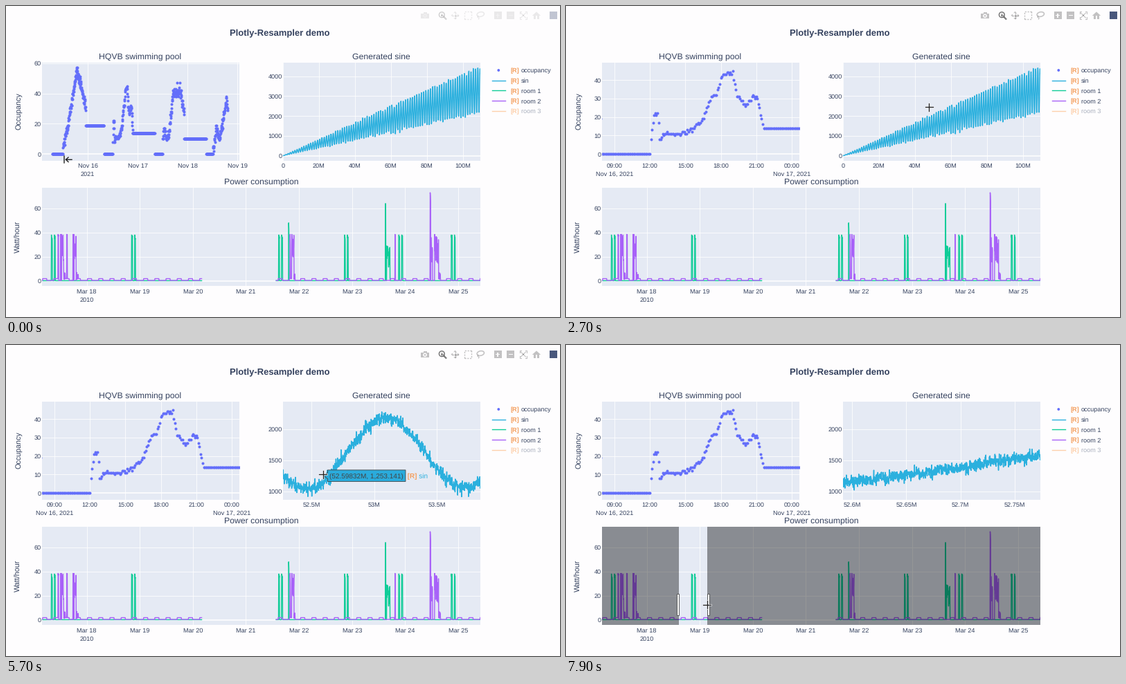
A matplotlib script for the animation above (8 s loop, 800x450 px).

```python
import matplotlib.pyplot as plt
import numpy as np
from matplotlib.animation import FuncAnimation
from matplotlib.lines import Line2D
from matplotlib.patches import Circle, Ellipse, Polygon, Rectangle
from matplotlib.patheffects import withStroke

W, H, STEP, LOOP = 800, 450, 100, 8000
PT = 0.72  # points per pixel at 100 dpi
PAPER, PLOT, INK, GREY = "#fefdfe", "#e5eaf4", "#35425f", "#444444"
DOT, SINE, GREEN, PURPLE = "#636efa", "#2bb0de", "#10cc98", "#a862f8"
TAG, SAND = "#f4a060", "#fdd0ac"

plt.rcParams.update({"font.family": "Liberation Sans", "path.simplify": False,
                     "text.hinting": "none"})
fig = plt.figure(figsize=(W / 100, H / 100), dpi=100, facecolor=PAPER)
ax = fig.add_axes([0, 0, 1, 1])
ax.set_xlim(0, W)
ax.set_ylim(H, 0)
ax.axis("off")
rng = np.random.default_rng(11)


def line(xs, ys, px=1.0, color="white", z=2, **kw):
    return ax.add_line(Line2D(xs, ys, lw=px * PT, color=color, zorder=z, **kw))


def rect(x0, y0, x1, y1, color, z=1, **kw):
    return ax.add_patch(Rectangle((x0, y0), x1 - x0, y1 - y0, fc=color, zorder=z, **kw))


def poly(points, color=GREY, z=7, **kw):
    return ax.add_patch(Polygon(points, **{"fc": color, "ec": "none", "zorder": z, **kw}))


def text(x, y, s, px=9.2, color=INK, ha="center", z=6, **kw):
    """Text whose capitals are centred on y."""
    return ax.text(x, y + 0.36 * px, s, size=px * PT, color=color, ha=ha,
                   va="baseline", zorder=z, **kw)


class View:
    """One state of a subplot: its ranges, ticks, grid and traces."""

    def __init__(self, box, xr, yr, xticks, yticks):
        self.box, self.xr, self.yr, self.parts = box, xr, yr, []
        x0, y0, x1, y1 = box
        self.clip = Rectangle((x0, y0), x1 - x0, y1 - y0, transform=ax.transData)
        for v, label in xticks:
            x = self.px(v)
            label, *below = label.split("\n")
            self.parts += [line([x, x], [y0, y1], 0.8), text(x, y1 + 7.3, label)]
            self.parts += [text(x, y1 + 19.5, s) for s in below]
        for v in yticks:
            y = self.py(v)
            self.parts += [line([x0, x1], [y, y], 0.8 if v else 1.6),
                           text(x0 - 1, y, str(v), ha="right")]

    def px(self, v):
        x0, _, x1, _ = self.box
        return x0 + (np.asarray(v) - self.xr[0]) / (self.xr[1] - self.xr[0]) * (x1 - x0)

    def py(self, v):
        _, y0, _, y1 = self.box
        return y1 - (np.asarray(v) - self.yr[0]) / (self.yr[1] - self.yr[0]) * (y1 - y0)

    def trace(self, x, y, color, px=1.5, z=3, **kw):
        art = line(self.px(x), self.py(y), px, color, z, solid_joinstyle="round", **kw)
        art.set_clip_path(self.clip)
        self.parts.append(art)

    def show(self, on):
        for p in self.parts:
            p.set_visible(on)


POOL = (51.5, 82, 337, 223.5)
SIN = (400, 82, 685, 223.5)
POWER = (51.5, 263.2, 685, 405)
for b in (POOL, SIN, POWER):
    rect(*b, PLOT)

# --- swimming pool, in hours: zeros, a busy stretch, then a stuck level ---
DAYS = [
    (-17, 19, [(-12, 3), (-9, 24), (-5.3, 55), (-3.3, 45), (-1, 30)]),
    (7.9, 14, [(12.05, 7), (12.35, 21), (12.7, 21), (12.8, 8), (13.1, 10.5), (15.4, 12),
               (16.5, 19), (17.2, 31), (17.6, 32), (18.1, 43), (19, 44), (19.4, 31),
               (20.1, 26), (20.7, 31), (21.1, 30), (21.6, 15)]),
    (32.2, 10, [(36, 11), (37, 17), (38, 9), (39, 12), (41, 40), (44.4, 42), (46.4, 26)]),
    (57, 0, [(60.2, 2), (62, 17), (63.3, 9), (66.8, 36), (67.3, 28)]),
]
hours = np.arange(-17, 67.3, 1 / 11)
people = np.zeros(hours.size)
for start, rest, keys in DAYS:
    h, v = np.array(keys).T
    busy = (hours >= h[0]) & (hours <= h[-1])
    people[hours >= start] = 0
    people[busy] = np.interp(hours[busy], h, v)
    people[busy] += rng.normal(0, 0.6 if start == 7.9 else 1.7, busy.sum())
    people[hours > h[-1]] = rest
people = people.round().clip(0)

pool_views = [
    View(POOL, (-22.17, 73), (-4.24, 60.3),
         [(24 * d, f"Nov {16 + d}" + ("" if d else "\n2021")) for d in range(4)],
         range(0, 61, 20)),
    View(POOL, (7.92, 24.65), (-3.48, 49.4),
         [(h, f"{h % 24:02}:00" + (f"\nNov {16 + h // 24}, 2021" if h in (9, 24) else ""))
          for h in range(9, 25, 3)], range(0, 41, 10)),
]
for v in pool_views:
    v.trace(hours, people, DOT, ls="none", marker="o", ms=4 * PT, mew=0)

# --- growing noisy sine, x in millions ---
ZOOM_Y = (872, 2444)


def millions(start, stop, step):
    return [(m, f"{m:g}M" if m else "0") for m in np.arange(start, stop, step)]


sine_views = [View(SIN, (0, 109.8), (-236, 4685), millions(0, 101, 20),
                   range(0, 4001, 1000))]
sine_views += [View(SIN, xr, ZOOM_Y, millions(*ticks), range(1000, 2001, 500))
               for xr, ticks in (((47.82, 58.2), (48, 59, 2)),
                                 ((52.273, 53.845), (52.5, 53.6, 0.5)),
                                 ((52.5914, 52.774), (52.6, 52.76, 0.05)))]
for v in sine_views:
    m = np.linspace(*v.xr, 1000)
    noise = rng.normal(0, 0.95, m.size) * np.minimum(m, 55)
    v.trace(m, m * (30.4 + 10.6 * np.sin(m / 0.2)) + noise, SINE, 1.5)

# --- power consumption, x in pixels ---
power = View(POWER, (51.5, 685), (-4.1, 76.9),
             [(116.5 + 76.65 * d, f"Mar {18 + d}" + ("" if d else "\n2010"))
              for d in range(8)], range(0, 61, 20))
px = np.arange(51.5, 685, 0.3)
outage = (px > 282.5) & (px < 390)


def burst(y, starts, width, low, high):
    for x in starts:
        k = (px >= x) & (px < x + width)
        y[k] = rng.uniform(low, high, k.sum())
        y[np.argmax(k)] = high


green = np.full(px.size, 0.2)
for x in (65.5, 181.3, 393.6, 488.6, 567, 643):
    burst(green, (x, x + 4.3), 1.3, 34, 38)
burst(green, [408], 0.7, 40, 48)
burst(green, [547.7], 0.7, 55, 64)
burst(green, [549.5], 5, 9, 29)

purple = np.where((px - 117.5) % 16.2 < 6, 1.9, 0.4)
burst(purple, (83, 102, 415, 625), 2.4, 1, 7)
burst(purple, (75, 78.7, 87.6, 96.7, 410, 561.5), 0.8, 28, 38.5)
burst(purple, (80, 98, 412.5, 619), 3.2, 17, 38.5)
burst(purple, [613.4, 622], 2.6, 13, 36)
burst(purple, [612.4], 0.7, 60, 73)
for y, color, z in ((green, GREEN, 3), (purple, PURPLE, 4)):
    y[outage] = np.nan
    power.trace(px, y, color, 1.4, z)

# --- titles and legend ---
text(395.2, 38.8, "Plotly-Resampler demo", 13.05, weight="bold")
for x, y, s in ((194, 72.7, "HQVB swimming pool"), (542.3, 72.7, "Generated sine"),
                (368.3, 254.3, "Power consumption")):
    text(x, y, s, 12.24)
for y, s in ((152.5, "Occupancy"), (334, "Watt/hour")):
    ax.text(18, y, s, size=10.75 * PT, color=INK, rotation=90, ha="center", va="center")

LEGEND = [("occupancy", DOT), ("sin", SINE), ("room 1", GREEN), ("room 2", PURPLE),
          ("room 3", SAND)]
for i, (name, color) in enumerate(LEGEND):
    y, off = 93 + 14.65 * i, name == "room 3"
    if i:
        line([702, 720.5], [y, y], 1.4, color)
    else:
        ax.add_patch(Circle((711.3, y), 1.9, fc=color))
    text(728.3, y + 0.3, "[R]", color=SAND if off else TAG, ha="left", weight="bold")
    text(743.5, y + 0.3, name, color="#a8afbd" if off else INK, ha="left")

# --- toolbar, one icon after another around a common middle ---
MID = 13.6
bar = []


def tool(art, a=0.32):
    bar.append((art, a))


def stroke(xs, ys, w=1.4, a=0.32, color=GREY, **kw):
    tool(line(xs, ys, w, color, 7, **kw), a)


def block(x, y, w, h, a=0.32, color=GREY):
    tool(rect(x - w / 2, y - h / 2, x + w / 2, y + h / 2, color, 7, ec="none"), a)


def ring(x, y, w, h, color=GREY, a=0.32, **kw):
    tool(ax.add_patch(Ellipse((x, y), w, h, fc="none", ec=color, lw=1.1, zorder=8, **kw)), a)


SIDES = [(1, 0), (-1, 0), (0, 1), (0, -1)]
CORNERS = [(-1, -1), (1, -1), (-1, 1), (1, 1)]

block(605, 14.3, 12, 7.4)
block(605, 9.8, 5, 1.6)
ring(605, 14.3, 4.2, 4.2, PAPER, 1)
ring(629.3, 12.7, 7.8, 7.8, a=0.7)
stroke([632.3, 635.3], [15.7, 18.8], 2.2, 0.7)
for dx, dy in SIDES:
    stroke([629.3, 629.3 + 1.8 * dx], [12.7, 12.7 + 1.8 * dy], 1, 0.7)
    d, n = np.array([dx, dy]), np.array([dy, dx])
    c = np.array([648.5, MID])
    stroke(*zip(c, c + 4 * d))
    tool(poly([c + 6 * d, c + 3.4 * d + 2.2 * n, c + 3.4 * d - 2.2 * n]))
    stroke(*zip(np.array([667, MID]) + 5.4 * (d - n), np.array([667, MID]) + 5.4 * (d + n)),
           linestyle=(0, (1.5, 1.2)))
ring(685.3, 12, 10.5, 6.6, angle=-12)
stroke([681.5, 681, 683.2, 682.5], [14.6, 16.5, 17.2, 19], 1.2)
for x in (710, 728.5):
    block(x, MID, 11, 10.8)
    block(x, MID, 6, 1.6, 1, PAPER)
block(710, MID, 1.6, 6, 1, PAPER)
for sx, sy in CORNERS:
    stroke([747, 747 + 3.4 * sx], [MID, MID + 3.4 * sy], 1.1)
    stroke([747 + 2.8 * sx, 747 + 5.2 * sx, 747 + 5.2 * sx],
           [MID + 5.2 * sy, MID + 5.2 * sy, MID + 2.8 * sy], 1.1)
tool(poly([(759.8, 14), (766, 8.4), (772.2, 14)]))
for x in (763.1, 768.9):
    block(x, 16.4, 3, 4.8)
block(790.3, MID, 11.4, 11.4, 0.95, "#3f4f75")


# --- hover labels ---
def hover(view, m, v):
    x, y = view.px(m), view.py(v)
    x0, x1, t, b = x + 5.5, x + 118, y - 8.3, y + 8.3
    halo = dict(path_effects=[withStroke(linewidth=1.6, foreground=PLOT)])
    return [
        poly([(x, y), (x0, y - 4.5), (x0, t), (x1, t), (x1, b), (x0, b), (x0, y + 4.5)],
             "#2aabdc", 9, ec=GREY, lw=0.6),
        text(x0 + 2.4, y, f"({m}M, {v:,})", 10, GREY, "left", 10),
        text(x1 + 2.6, y, "[R]", 10, TAG, "left", 10, weight="bold", **halo),
        text(x1 + 19.3, y, "sin", 10, SINE, "left", 10, **halo),
    ]


hovers = [(3600, hover(sine_views[1], 52.32831, 1222.092)),
          (5700, hover(sine_views[2], 52.59832, 1253.141))]


# --- zoom selections ---
class Drag:
    """Mouse press, end of the pull and release, selecting xr (and yr) in a view."""

    def __init__(self, press, stop, release, view, xr, y=None, yr=None):
        self.press, self.stop, self.release = press, stop, release
        self.box, self.boxed = view.box, yr is not None
        low, top = view.py(yr) if self.boxed else (y, y)
        x0, x1 = view.px(xr)
        self.start, self.end = np.array([x0, top]), np.array([x1, low])

    def at(self, t):
        k = np.clip((t - self.press) / (self.stop - self.press), 0, 1)
        return self.start + k * (self.end - self.start)


s0, s1, s2, s3 = sine_views
drags = [
    Drag(800, 1500, 1900, pool_views[0], pool_views[1].xr, y=211),
    Drag(2700, 3200, 3300, s0, s1.xr, yr=ZOOM_Y),
    Drag(3800, 4500, 4800, s1, s2.xr, y=170),
    Drag(5800, 6300, 6500, s2, s3.xr, y=187),
    Drag(7000, 7800, LOOP, power, (162.5, 203.5), y=375.5),
]
shades = [rect(0, 0, 1, 1, "black", 11, alpha=0.4, ec="none") for _ in range(4)]
handles = [rect(0, 0, 3, 31, "white", 12, ec=GREY, lw=0.6) for _ in range(2)]
brackets = [[line([], [], w, c, 12) for w, c in ((3.4, GREY), (2, "white"))]
            for _ in CORNERS]
cross = [line([], [], w, c, 14) for w, c in ((2.6, "#f4f6fa"), (1.3, "#222222"))]
resize = line([], [], 1.4, "#222222", 14)


def pointer(t):
    """Ease to the next press, then pull evenly."""
    free, spot = 0, np.array([88, 222])
    for d in drags:
        if t < d.press:
            k = min(1, (t - free) / (d.press - 100 - free))
            return spot + k * k * (3 - 2 * k) * (d.start - spot)
        if t < d.release:
            return d.at(t)
        free, spot = d.release, d.end
    return spot


def toolbar_alpha(t):
    """Fade in after each release, out after each press."""
    free, shown = -100, 0
    for d in drags:
        fade_in, fade_out = np.clip([(t - free) / 300, (t - d.press) / 200], 0, 1)
        shown = max(shown, min(fade_in, 1 - fade_out))
        free = d.release
    return shown


def select(t):
    for art in shades + handles + sum(brackets, []):
        art.set_visible(False)
    d = next((d for d in drags if d.press + STEP < t < d.release), None)
    if not d:
        return
    x0, y0, x1, y1 = d.box
    (ax0, ay0), (bx, by) = d.start, d.at(t - STEP)  # trails the pointer a little
    top, low = (ay0, by) if d.boxed else (y0, y1)
    bounds = [(x0, y0, ax0, y1), (bx, y0, x1, y1), (ax0, y0, bx, top), (ax0, low, bx, y1)]
    for art, (l, u, r, b) in zip(shades, bounds):
        art.set_bounds(l, u, r - l, b - u)
        art.set_visible(True)
    if not d.boxed:
        for art, x in zip(handles, (ax0 - 3, bx)):
            art.set_xy((x, ay0 - 15.5))
            art.set_visible(True)
        return
    size = min(8, (bx - ax0) / 2)
    for pair, (sx, sy) in zip(brackets, CORNERS):
        cx = (ax0 if sx < 0 else bx) + 2 * sx
        cy = (top if sy < 0 else low) + 2 * sy
        for art in pair:
            art.set_data([cx - size * sx, cx, cx], [cy, cy, cy - size * sy])
            art.set_visible(True)


def draw(i):
    t = i * STEP
    for views in (pool_views, sine_views):
        zooms = sum(d.box == views[0].box and t >= d.release for d in drags)
        for k, v in enumerate(views):
            v.show(k == zooms)
    shown = toolbar_alpha(t)
    for art, a in bar:
        art.set_alpha(a * shown)
    for when, parts in hovers:
        for p in parts:
            p.set_visible(abs(t - when) <= STEP)
    select(t)

    x, y = pointer(t)
    edge = t < 200
    for art in cross:
        art.set_data([x - 5.5, x + 5.5, np.nan, x, x], [y, y, np.nan, y - 5.5, y + 5.5])
        art.set_visible(not edge)
    gap = np.nan
    resize.set_data(x + np.array([-4, -4, gap, 7, -1.5, gap, 2, -1.5, 2]),
                    y + np.array([-5, 5, gap, 0.3, 0.3, gap, -3, 0.3, 3.6]))
    resize.set_visible(edge)
    return []


anim = FuncAnimation(fig, draw, frames=LOOP // STEP, interval=STEP, repeat=True,
                     repeat_delay=0, blit=False)
plt.show()
```
